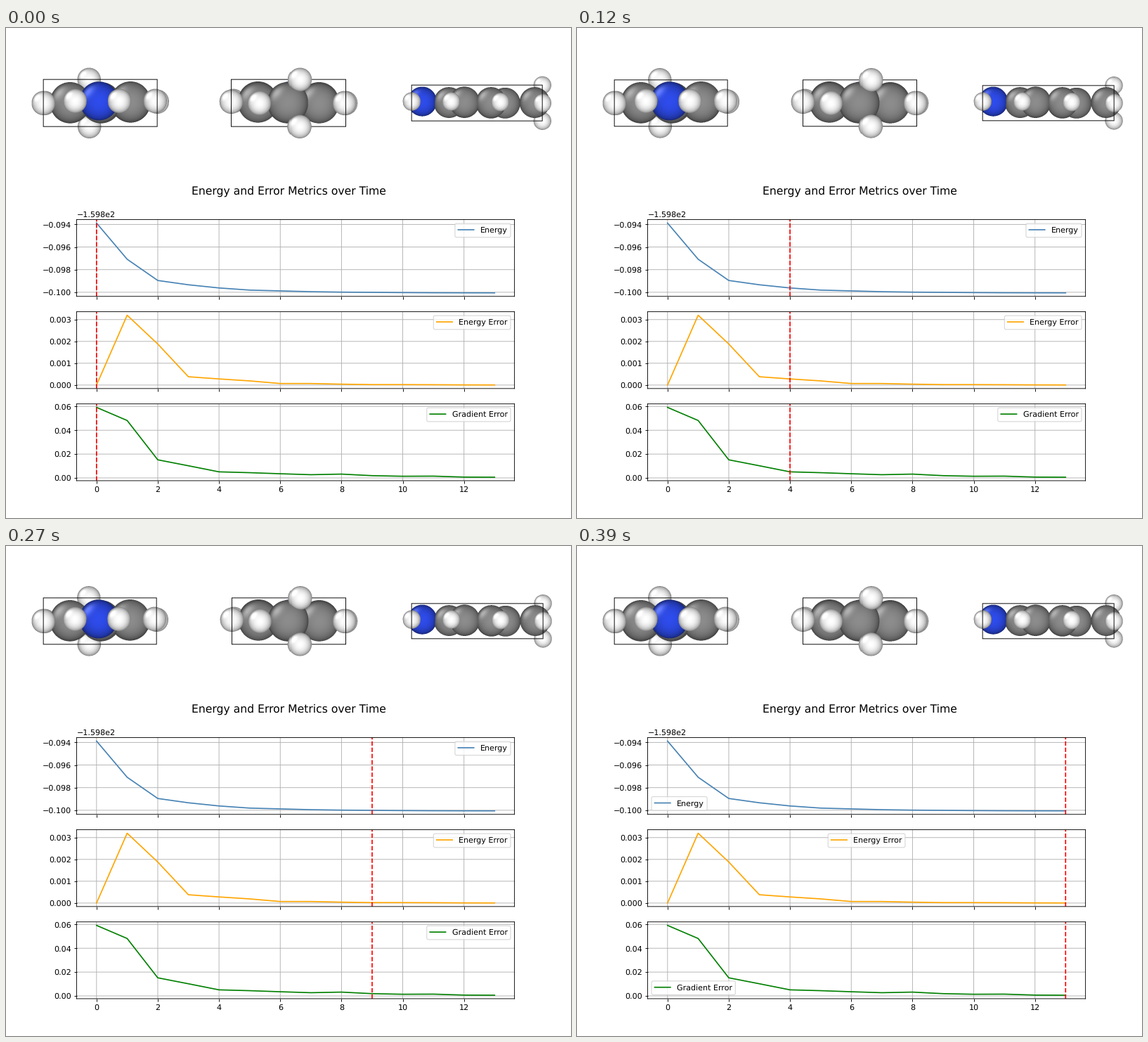
A matplotlib script that plays this animation: 804x697 px, repeating every 0.42 s.

```python
import numpy as np
import matplotlib.pyplot as plt
from matplotlib.animation import FuncAnimation

# Soft edges: lines and glyphs keep their fractional positions
plt.rcParams.update({"path.snap": False, "text.hinting": "none"})

DPI = 80.4
WIDTH, HEIGHT, STRIP = 804, 697, 215
PLOT = 482.4 / HEIGHT      # share of the height used by the charts
SS = 3                     # supersampling of the molecule strip
SIDE = 0.757               # scale of the side view
MID_Y = 106.8
STEPS = 14

# Optimisation data
energy_err = np.array([0, 320, 188, 38, 28, 19, 7, 7, 4, 2, 2, 1.5, 0.7, 0.4]) * 1e-5
energy = -159.89388 - np.cumsum(energy_err)
grad_err = np.array([592, 482, 152, 102, 51, 44, 35, 27, 32, 19, 14, 15, 7, 6]) * 1e-4
progress = (energy[0] - energy) / (energy[0] - energy[-1])

# Element: radius, colour
ELEMENTS = {
    "H": (16.7, (255, 255, 255)),
    "C": (28.3, (140, 140, 140)),
    "N": (27.1, (46, 76, 236)),
}

# Element, lateral, vertical, position along the molecule
ATOMS = [
    ("N", -2, -3, 592), ("H", -36, -3, 577), ("H", 27, -3, 577),
    ("C", 0, -1, 630), ("C", -43, -1, 652), ("C", 43, -2, 652),
    ("C", -43, 0, 690), ("C", 43, -1, 690), ("C", 1, 0, 710),
    ("C", 1, -1, 752), ("H", -16, -33, 763), ("H", -15.5, 33, 763),
    ("H", 41, 0, 763), ("H", -81, 0, 633), ("H", 78, -3, 633),
    ("H", -79, 0, 703), ("H", 81, -2, 703),
]
KINDS = [a[0] for a in ATOMS]
U, V, W = np.array([a[1:] for a in ATOMS], float).T
W = (W - 670) / SIDE

AMBIENT, SHININESS, GLOSS = 0.4, 6, 0.25
LIGHT = np.array([-1.8, -1.5, -0.2])       # y points down
LIGHT /= np.linalg.norm(LIGHT)

XS = (np.arange(WIDTH * SS) + 0.5) / SS - 0.5
YS = (np.arange(STRIP * SS) + 0.5) / SS - 0.5


def span(lo, hi, size):
    """Sample range that covers the pixels from lo to hi."""
    return slice(max(0, int((lo - 1) * SS)), min(size * SS, int((hi + 2) * SS)))


def draw_ball(img, depth, x, y, z, r, color):
    box = span(y - r, y + r, STRIP), span(x - r, x + r, WIDTH)
    nx = (XS[box[1]][None, :] - x) / r
    ny = (YS[box[0]][:, None] - y) / r
    q = 1 - nx ** 2 - ny ** 2
    nz = np.sqrt(np.maximum(q, 0))
    front = z + r * nz
    seen = (q > 0) & (front > depth[box])
    facing = nx * LIGHT[0] + ny * LIGHT[1] + nz * LIGHT[2]
    mirror = np.maximum(2 * facing * nz - LIGHT[2], 0)
    matte = AMBIENT + (1 - AMBIENT) * nz
    gloss = 255 * GLOSS * mirror ** SHININESS
    shade = np.minimum(matte[..., None] * np.array(color) + gloss[..., None], 255)
    img[box][seen] = shade[seen]
    depth[box][seen] = front[seen]


def draw_cell(img, depth, x, y, z):
    """Front face of the bounding cell, hidden by whatever is nearer."""
    x0, x1, y0, y1 = x.min(), x.max(), y.min(), y.max()
    box = span(y0, y1, STRIP), span(x0, x1, WIDTH)
    dx = np.abs(XS[box[1]] - (x0 + x1) / 2)[None, :] - (x1 - x0) / 2
    dy = np.abs(YS[box[0]] - (y0 + y1) / 2)[:, None] - (y1 - y0) / 2
    edge = np.abs(np.maximum(dx, dy)) < 0.5
    img[box][edge & (depth[box] < z.max())] = 15


def render(p):
    u = (U + 81) * (1 - 0.006 * p) - 81
    v = V * (1 - 0.015 * p)
    w = (W + 123) * (1 + 0.0042 * p) - 123
    views = [
        (133.7 + u, MID_Y + v, -w, 1),
        (401 - u, MID_Y + v, w, 1),
        (668.8 + SIDE * w, MID_Y + SIDE * v, SIDE * u, SIDE),
    ]
    img = np.full((STRIP * SS, WIDTH * SS, 3), 255.0)
    depth = np.full(img.shape[:2], -1e6)
    for x, y, z, scale in views:
        for kind, cx, cy, cz in zip(KINDS, x, y, z):
            r, color = ELEMENTS[kind]
            draw_ball(img, depth, cx, cy, cz, r * scale, color)
        draw_cell(img, depth, x, y, z)
    img = img.reshape(STRIP, SS, WIDTH, SS, 3).mean(axis=(1, 3))
    return img.round().astype(np.uint8)


fig = plt.figure(figsize=((WIDTH + 1e-6) / DPI, (HEIGHT + 1e-6) / DPI), dpi=DPI,
                 facecolor="white")

top = fig.add_axes([0, 1 - STRIP / HEIGHT, 1, STRIP / HEIGHT])
top.axis("off")
molecules = top.imshow(render(0), aspect="auto", interpolation="nearest")

axes = fig.subplots(3, 1, sharex=True, gridspec_kw=dict(
    left=0.125, right=0.9, bottom=0.11 * PLOT, top=0.88 * PLOT, hspace=0.2))
fig.suptitle("Energy and Error Metrics over Time", fontsize=14, y=0.98 * PLOT)

# Data, label, colour, step at which the legend gives way, its new place
CHARTS = [
    (energy, "Energy", "steelblue", 12, "lower left"),
    (energy_err, "Energy Error", "orange", 11, "upper center"),
    (grad_err, "Gradient Error", "green", 11, "lower left"),
]
markers, legends = [], []
for ax, (data, label, color, _, _) in zip(axes, CHARTS):
    ax.plot(range(STEPS), data, color=color, label=label)
    ax.grid(True)
    markers.append(ax.axvline(0, color="red", linestyle="--"))
    legends.append(ax.legend(loc="upper right"))
axes[0].ticklabel_format(axis="y", useOffset=-159.8)


def update(step):
    molecules.set_data(render(progress[step]))
    for marker, legend, (_, _, _, limit, place) in zip(markers, legends, CHARTS):
        marker.set_xdata([step, step])
        legend.set_loc(place if step >= limit else "upper right")
    return [molecules, *markers, *legends]


anim = FuncAnimation(fig, update, frames=STEPS, interval=30, repeat=True,
                     repeat_delay=0, blit=False)
plt.show()
```
